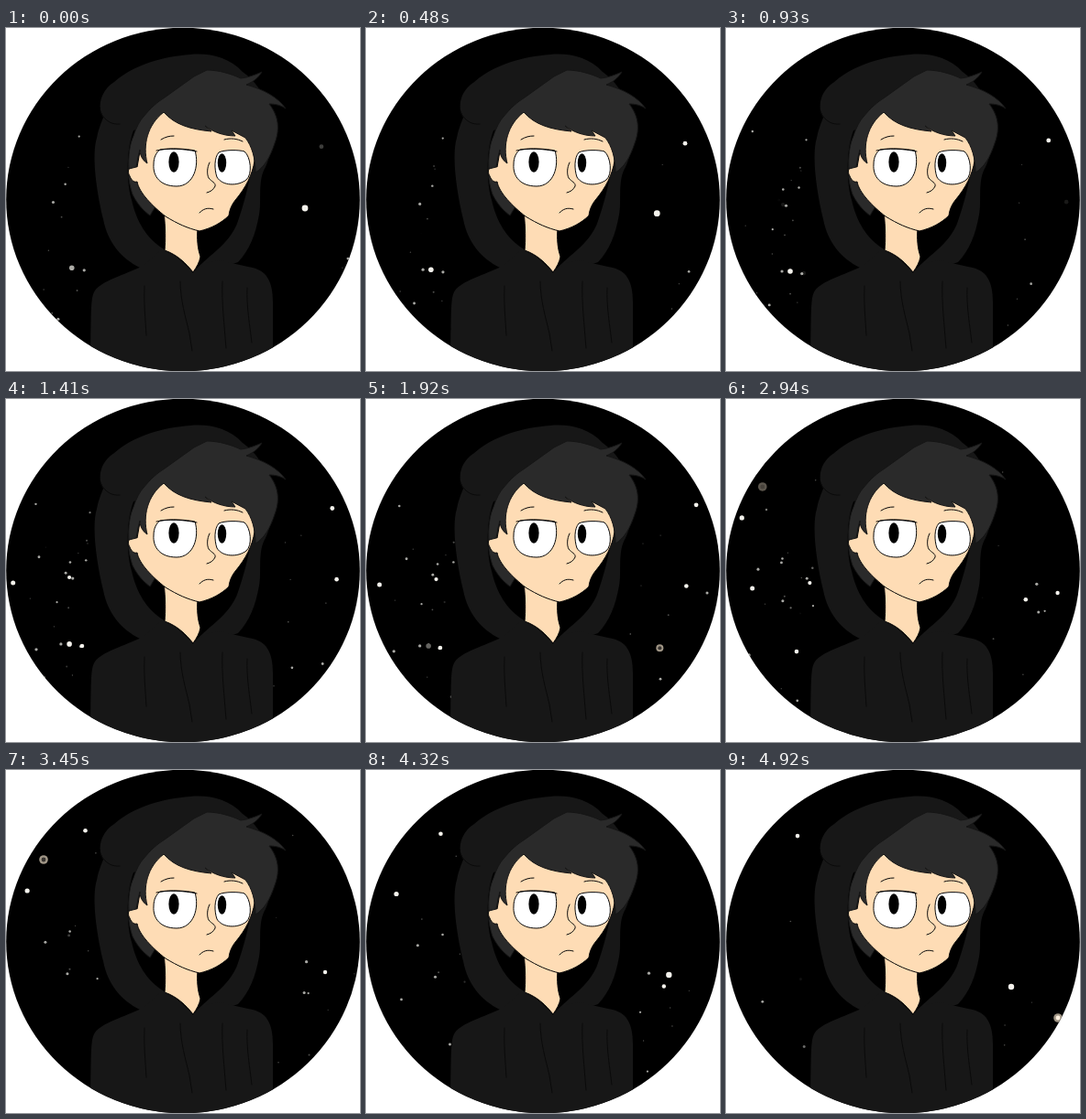
An HTML page for the animation above (4980 ms loop, 386 by 375 pixels).

```html
<!DOCTYPE html>
<html lang="en">
<head>
<meta charset="utf-8">
<title>Night sky portrait</title>
<style>
  html, body { margin: 0; width: 100%; height: 100%; overflow: hidden; background: #fff; }
  svg { display: block; width: 386px; height: 375px; }
  .line { fill: none; stroke: #080808; stroke-linecap: round; stroke-linejoin: round; }
  .cloth { fill: #171717; }
  .fold { fill: none; stroke: #0a0a0a; stroke-linecap: round; }
  .skin { fill: #fedcb5; stroke: #080808; }
  .hair { fill: #2a2a2a; stroke: #151515; }
  .eye { fill: #fff; stroke: #080808; }
</style>
</head>
<body>
<svg viewBox="0 0 386 375" xmlns="http://www.w3.org/2000/svg">
  <defs>
    <clipPath id="disc"><ellipse cx="193" cy="187.5" rx="192.8" ry="187.8"/></clipPath>
  </defs>
  <g clip-path="url(#disc)">
    <rect width="386" height="375" fill="#000"/>
    <g id="sky"></g>

    <!-- hood and beanie -->
    <path class="cloth" d="M103 90C101 78 107 66 118 59C138 41 170 31 201 29C222 27 243 32 258 48
      C272 58 280 70 285 86C294 108 292 132 283 152C274 166 279 190 276 204C272 226 266 242 253 256
      L204 272L146 262C126 252 111 235 106 209C99 180 93 140 99 120C101 110 104 103 106 98Z"/>
    <path class="fold" d="M103 92C108 102 116 106 124 105"/>

    <!-- hood opening -->
    <path fill="#000" d="M139 112C130 136 132 172 137 188C142 210 152 230 174 243L204 268
      C216 251 244 238 253 211C260 190 264 175 267 155L230 90Z"/>

    <!-- shoulders -->
    <path class="cloth" d="M150 260C128 270 104 277 97 287C92 295 93 306 92 375H291V300
      C291 276 284 264 264 261L246 257C228 251 213 256 204 268C193 255 182 246 170 242Z"/>
    <path class="fold" d="M151 282C150 300 152 318 153 336M190 277C190 297 196 317 200 334L203 353
      M236 277C235 300 238 324 240 350M263 284C262 304 266 326 268 344"/>

    <!-- back hair, neck, face and ear -->
    <path class="hair" d="M137 130C130 152 134 170 138 182C143 192 149 199 157 205L166 190L150 130Z"/>
    <path class="skin" d="M172 200C174 219 174 232 173 243C187 248 196 257 204 267C208 261 211 256 212 250
      C209 241 208 232 209 217Z"/>
    <path class="skin" d="M172 88L150 112L143 152C135 148 131 156 135 162C137 167 140 169 143 168
      C145 180 160 195 174 206C187 214 198 219 211 222C224 219 235 213 243 205C244 198 246 193 251 187
      C261 175 269 160 271 145L268 110Z"/>

    <!-- eyes, brows, nose and mouth -->
    <path class="eye" d="M168 133C180 131 196 132 206 134C211 150 205 173 186 173
      C168 173 160 162 161 149C161 141 164 136 168 133Z"/>
    <path class="eye" d="M232 136C238 133 254 133 260 135C267 141 269 160 262 166
      C253 173 236 173 230 163C227 154 227 142 232 136Z"/>
    <ellipse cx="183" cy="146.5" rx="5.6" ry="11.2"/>
    <ellipse cx="235.5" cy="147.5" rx="4.7" ry="10.3"/>
    <path class="line" d="M164 134C177 131 193 132 208 135M169 122C174 119 178 118 183 118
      M238 122C245 120 252 121 258 124
      M222 147C219 153 219 160 221 164C224 168 229 169 228 173C226 177 223 179 219 180
      M211 202C215 198 219 196 226 198"/>

    <!-- hair -->
    <path class="hair" d="M219 46C232 46 245 50 256 55C265 54 272 51 279 48C275 55 269 59 262 62
      C280 67 296 75 305 88C299 84 293 83 287 83C297 96 299 110 293 126C288 141 282 152 272 158
      C272 142 268 129 261 120L246 112L250 118C238 118 226 114 217 107L224 113
      C202 111 184 106 172 92C154 106 149 128 154 148C148 144 146 138 146 133C144 140 143 147 142 152
      L134 154C133 139 135 127 139 118C142 109 146 101 150 97C158 87 165 81 173 76L205 53Z"/>
  </g>
</svg>
<script>
const LOOP = 4980, STEP = 30, FADE = .2;
const sky = document.getElementById("sky");

// Where the brightest stars pass: time in s, x, y, radius
const bright = [
  [1.2, 354, 121, 2.4], [0, 326, 197, 3.4], [2.16, 344, 208, 2.3], [3.45, 348, 221, 2.2],
  [4.92, 311, 237, 3.2], [.93, 70, 266, 2.8], [2.16, 80, 273, 2.3], [2.16, 18, 204, 2.5],
  [2.16, 80, 198, 2.1], [3.7, 26, 133, 2.6], [4.4, 81, 70, 2.3]
];
const large = [[2.16, 309, 280, 4], [3.45, 41, 98, 4.8], [4.92, 362, 271, 4.8]];

let seed = 29;
const rand = () => (seed = seed * 16807 % 2147483647) / 2147483647;

const dust = Array.from({ length: 64 }, (_, i) => {
  const leftSide = i % 3 > 0;
  const x = leftSide ? 28 + rand() * 70 : 290 + rand() * 75;
  const y = 70 + Math.sqrt(rand()) * 260;
  return [rand() * LOOP / 1000, x, y, .6 + rand() ** 2 * 1.1];
});

// The left side sways with height, the right side sweeps down to the left
function drift(x, y) {
  return x < 193
    ? [16 * Math.sin((y - 90) / 54), 4]
    : [.35 * (145 - y), .25 * (y - 150)];
}

function dot(r, fill) {
  const c = document.createElementNS("http://www.w3.org/2000/svg", "circle");
  c.setAttribute("r", r);
  c.setAttribute("fill", fill);
  sky.append(c);
  return c;
}

function makeStar([at, x, y, r], fill, core) {
  const [vx, vy] = drift(x, y);
  const dots = [dot(r, fill)];
  if (core) dots.push(dot(r * .5, core));
  return { at, x, y, vx, vy, span: Math.min(1.25, 3 / r), dots };
}

const stars = [
  ...dust.map(p => makeStar(p, p[3] > 1.1 ? "#a8a8a4" : "#4c4c4a")),
  ...bright.map(p => makeStar(p, "#f4f2ec")),
  ...large.map(p => makeStar(p, "#a09686", p[0] > 4 ? "#fff0df" : "#383430"))
];

function draw(now) {
  const t = Math.floor(now % LOOP / STEP) * STEP / 1000;
  for (const { at, x, y, vx, vy, span, dots } of stars) {
    const age = t - at;
    const alpha = Math.max(0, Math.min(1, (span - Math.abs(age)) / FADE));
    for (const c of dots) {
      c.setAttribute("cx", x + vx * age);
      c.setAttribute("cy", y + vy * age);
      c.setAttribute("opacity", alpha);
    }
  }
}

const began = performance.now();
function tick() {
  draw(performance.now() - began);
  requestAnimationFrame(tick);
}
tick();
</script>
</body>
</html>
```
